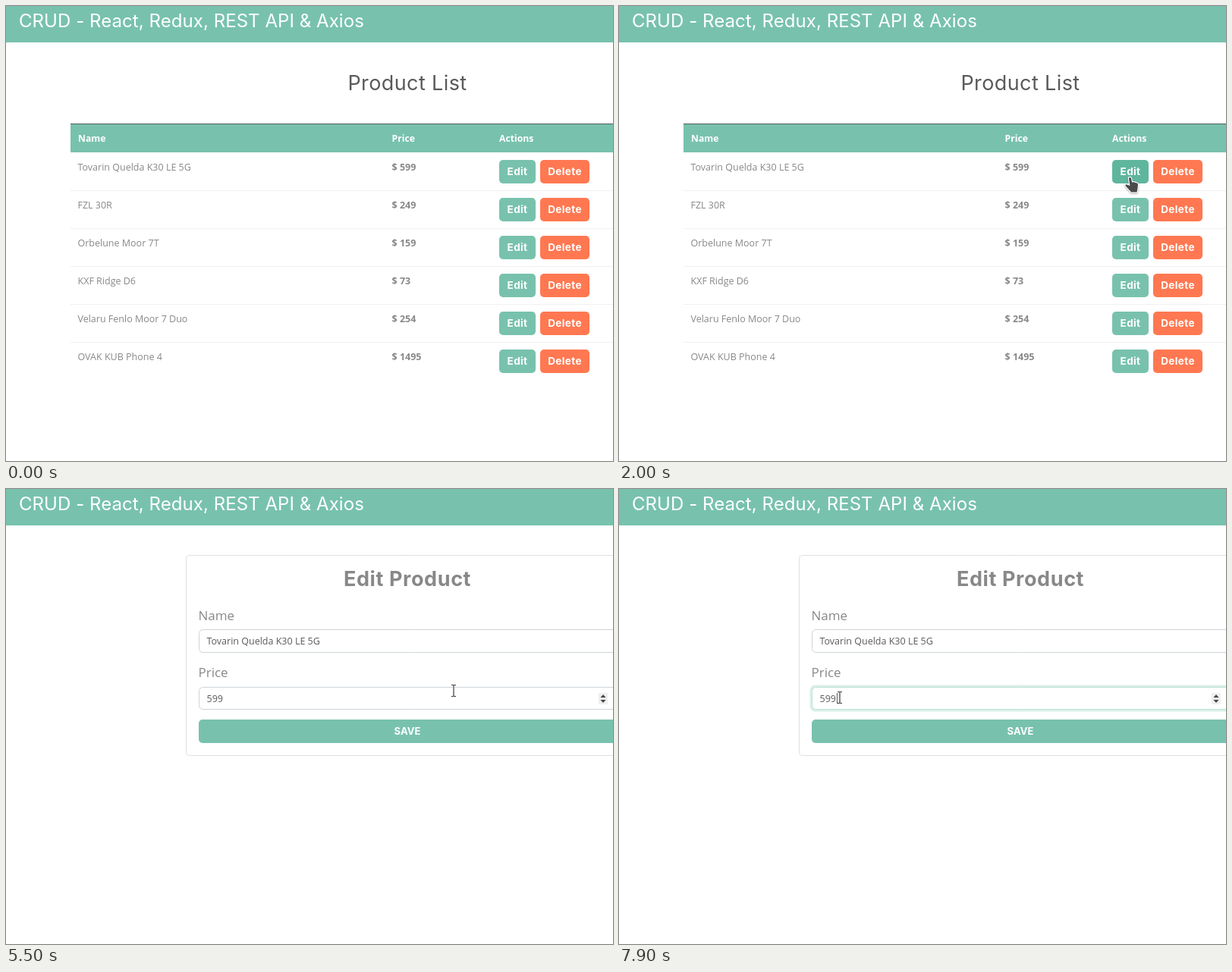
Write an HTML page with a canvas that moves like this. It is 800 px wide and 600 px high and loops after 8000 ms.

```html
<!DOCTYPE html>
<html lang="en">
<head>
<meta charset="utf-8">
<title>Product CRUD</title>
<style>
  html, body { margin: 0; width: 100%; height: 100%; overflow: hidden; background: #fff; }
  canvas { display: block; }
</style>
</head>
<body>
<canvas id="stage" width="800" height="600"></canvas>
<script>
const ctx = document.getElementById('stage').getContext('2d');
const LOOP = 8000, STEP = 100, FORM_AT = 4400;
const TEAL = '#78c2ad', GREY = '#888', DARK = '#5a5a5a';
const HEAD = 'Inter, sans-serif', BODY = '"Open Sans", sans-serif';
const CELL = '450 12.5px ' + BODY, LABEL = '450 17px ' + BODY;

const products = [
  ['Tovarin Quelda K30 LE 5G', 599],
  ['FZL 30R', 249],
  ['Orbelune Moor 7T', 159],
  ['KXF Ridge D6', 73],
  ['Velaru Fenlo Moor 7 Duo', 254],
  ['OVAK KUB Phone 4', 1495]
];

// Pointer path: time, x, y
const path = [
  [800, 792, 489], [1200, 745, 395], [1300, 713, 362], [1400, 686, 288],
  [1500, 679, 264], [1600, 677, 249], [1700, 674, 233], [2000, 672, 226],
  [5200, 672, 226], [5300, 666, 231], [5400, 640, 245], [5500, 590, 266],
  [5700, 430, 297], [5800, 350, 296], [5900, 302, 289], [6000, 282, 284],
  [6100, 282, 284], [6200, 278, 280], [6700, 278, 280], [6800, 281, 278],
  [6900, 278, 277], [7000, 278, 277], [7300, 291, 275]
];

function pointerAt(t) {
  if (t < path[0][0]) return null;
  const i = path.findIndex(p => p[0] > t);
  if (i < 0) return path.at(-1).slice(1);
  const [t0, x0, y0] = path[i - 1], [t1, x1, y1] = path[i];
  const k = (t - t0) / (t1 - t0);
  return [Math.round(x0 + (x1 - x0) * k), Math.round(y0 + (y1 - y0) * k)];
}

const inside = (p, x, y, w, h) =>
  !!p && p[0] >= x && p[0] < x + w && p[1] >= y && p[1] < y + h;

const mix = (a, b, k) =>
  `rgb(${a.map((v, i) => Math.round(v + (b[i] - v) * k)).join(',')})`;

function text(str, x, y, font, color, align = 'left', spacing = 0) {
  ctx.font = font;
  ctx.fillStyle = color;
  ctx.textAlign = align;
  ctx.letterSpacing = spacing + 'px';
  ctx.fillText(str, x, y);
}

function rect(x, y, w, h, color) {
  ctx.fillStyle = color;
  ctx.fillRect(x, y, w, h);
}

function round(x, y, w, h, r, fill, stroke) {
  ctx.beginPath();
  ctx.roundRect(x, y, w, h, r);
  if (fill) { ctx.fillStyle = fill; ctx.fill(); }
  if (stroke) { ctx.strokeStyle = stroke; ctx.lineWidth = 1; ctx.stroke(); }
}

function polygon(points, color) {
  ctx.beginPath();
  points.forEach(([x, y]) => ctx.lineTo(x, y));
  ctx.closePath();
  ctx.fillStyle = color;
  ctx.fill();
}

function button(label, x, y, w, base, hover, t) {
  const now = inside(pointerAt(t), x, y, w, 31);
  const before = inside(pointerAt(t - STEP), x, y, w, 31);
  round(x, y, w, 31, 5, mix(base, hover, (now + before) / 2));
  text(label, x + w / 2, y + 20, '700 13.5px ' + HEAD, '#fff', 'center', 0.4);
  return now;
}

function drawList(t) {
  text('Product List', 529, 111, '400 27px ' + HEAD, DARK, 'center', 0.4);
  rect(85, 155, 715, 38, TEAL);
  rect(85, 155, 715, 1, '#4d5f59');
  const bold = '700 12.5px ' + BODY, heading = '700 12.2px ' + BODY;
  text('Name', 95, 179, heading, '#fff');
  text('Price', 508.5, 179, heading, '#fff');
  text('Actions', 650, 179, heading, '#fff');

  let overButton = false;
  products.forEach(([name, price], i) => {
    const y = 193 + i * 50;
    if (i) rect(85, y, 715, 1, '#f0f0f0');
    text(name, 94.5, y + 24, CELL, GREY);
    text('$ ' + price, 508.5, y + 24, bold, GREY);
    const pressed = i === 0 && t >= 4200;
    if (pressed) {
      const ring = t >= 4300 ? 0.5 : 0.32;
      round(647, y + 7, 54, 37, 7, `rgba(140,203,185,${ring})`);
    }
    const hover = pressed ? [86, 178, 153] : [94, 182, 157];
    const edit = button('Edit', 650, y + 10, 48, [120, 194, 173], hover, t);
    const del = button('Delete', 704, y + 10, 65, [255, 120, 81], [255, 93, 45], t);
    overButton = overButton || edit || del;
  });
  return overButton ? hand : arrow;
}

function drawForm(t, p) {
  const overPrice = inside(p, 254, 261, 560, 30);
  const overName = inside(p, 254, 185, 560, 31);
  round(237.5, 87.5, 600, 264, 4, '#fff', '#dfdfdf');
  text('Edit Product', 529, 128, '700 27px ' + HEAD, GREY, 'center', 0.6);

  text('Name', 253.5, 173, LABEL, GREY);
  round(254.5, 185.5, 570, 30, 5, '#fff', '#ced4da');
  text(products[0][0], 264.5, 205, CELL, DARK);

  text('Price', 253.5, 248, LABEL, GREY);
  const focus = Math.min(1, Math.max(0, (t - 7600) / 300));
  if (focus) round(251.5, 258.5, 576, 35, 7, `rgba(120,194,173,${0.27 * focus})`);
  round(254.5, 261.5, 570, 29, 5, '#fff', mix([206, 212, 218], [190, 225, 215], focus));
  text('599', 264.5, 281, CELL, DARK);
  if (focus) rect(287, 269, 1, 14, DARK);
  if (overPrice) {
    rect(781, 269, 12, 15, '#efefef');
    polygon([[783.5, 275], [787, 271], [790.5, 275]], '#454545');
    polygon([[783.5, 278], [787, 282], [790.5, 278]], '#454545');
  }

  round(254, 304, 570, 31, 5, TEAL);
  text('SAVE', 529, 324, '700 13px ' + HEAD, '#fff', 'center', 0.1);
  return overPrice || overName ? beam : arrow;
}

// Dark shape with a white rim and a soft shadow
function pointerShape(shape) {
  ctx.lineJoin = 'round';
  ctx.lineWidth = 2.4;
  ctx.strokeStyle = '#fff';
  ctx.shadowColor = 'rgba(0,0,0,.35)';
  ctx.shadowBlur = 2;
  ctx.shadowOffsetY = 1;
  ctx.stroke(shape);
  ctx.shadowColor = 'transparent';
  ctx.fillStyle = '#4a4a4a';
  ctx.fill(shape);
}

const arrowShape = new Path2D('M0 0L11.5 11.5L7.5 12L9.7 16.6L7 18L4.6 13.5L0 17Z');
const handShape = new Path2D(
  'M0 1.6Q0 0 1.4 0Q2.8 0 3 1.6L4 6.5L6.5 6.3L8.6 7L10.6 7.6Q12 8 12 9.8' +
  'L11.4 15L10.6 19.5H3.2L-1 15L-4.5 11Q-5 9.4 -3.4 9.2L1.4 11Z');
const beamShape = new Path2D('M-3 -7.5H-1L0 -6.8L1 -7.5H3M0 -7V7M-3 7.5H-1L0 6.8L1 7.5H3');

function arrow() { pointerShape(arrowShape); }
function hand() { pointerShape(handShape); }

function beam() {
  ctx.strokeStyle = 'rgba(255,255,255,.85)';
  ctx.lineWidth = 3;
  ctx.stroke(beamShape);
  ctx.strokeStyle = '#3c3c3c';
  ctx.lineWidth = 1.2;
  ctx.stroke(beamShape);
}

function draw(now) {
  const t = Math.floor((now % LOOP) / STEP) * STEP;
  const p = pointerAt(t);
  rect(0, 0, 800, 600, '#fff');
  rect(0, 0, 800, 48, TEAL);
  text('CRUD - React, Redux, REST API & Axios', 17, 28, '400 24px ' + HEAD, '#fff', 'left', 0.06);
  const cursor = t < FORM_AT ? drawList(t) : drawForm(t, p);
  if (p) {
    ctx.save();
    ctx.translate(p[0], p[1]);
    cursor();
    ctx.restore();
  }
}

function tick() {
  draw(performance.now());
  requestAnimationFrame(tick);
}
tick();
</script>
</body>
</html>
```
